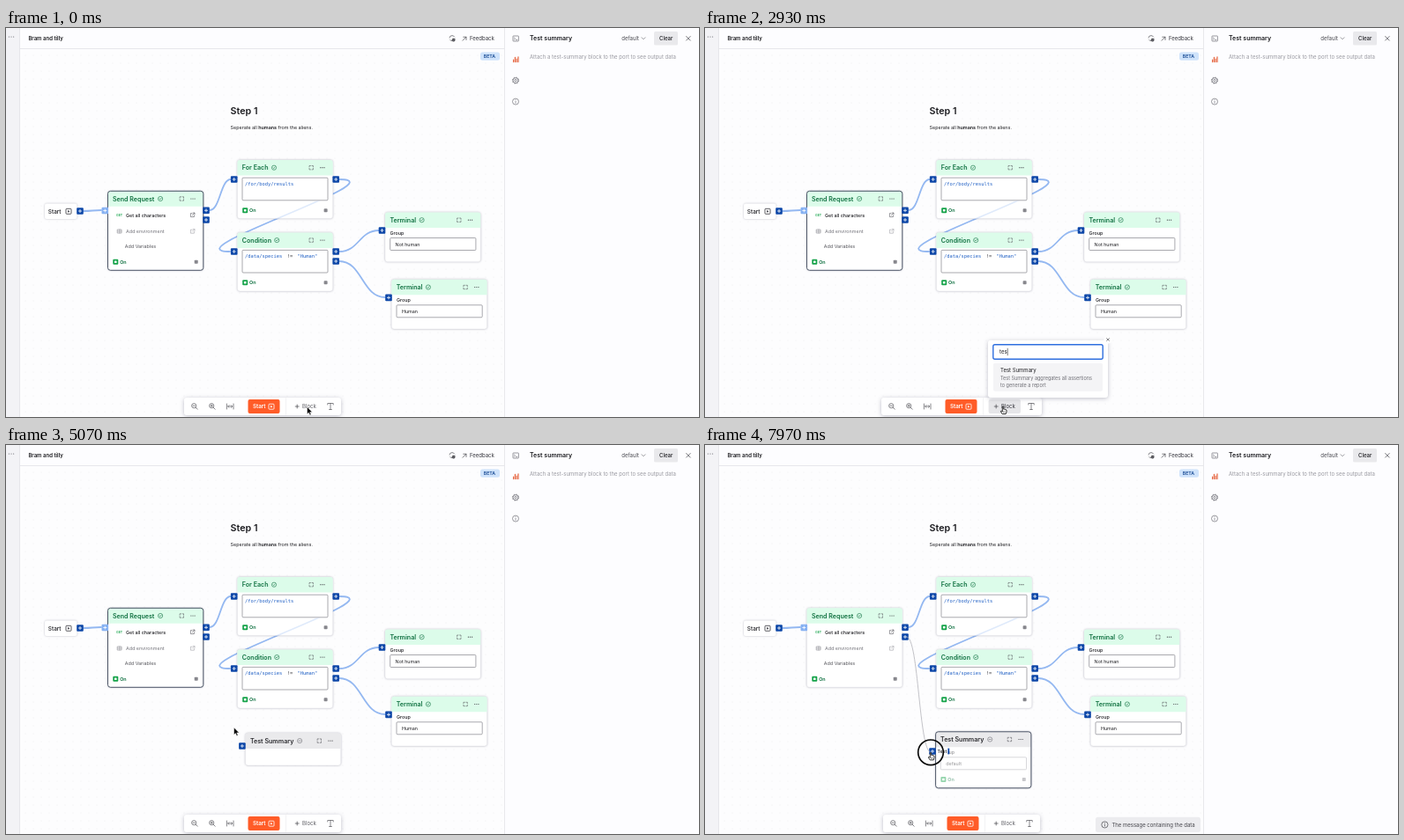
Write an HTML page that moves like this. It is 786 px wide and 442 px high and loops after 8000 ms.

```html
<!DOCTYPE html>
<html lang="en">
<head>
<meta charset="utf-8">
<title>Flow editor</title>
<style>
  html, body { margin: 0; width: 100%; height: 100%; overflow: hidden; background: #fcfcfe; }
  svg { display: block; width: 786px; height: 442px; font-family: Inter, sans-serif; }
  .mono { font-family: "DejaVu Sans Mono", monospace; }
  .card { filter: drop-shadow(0 .7px 1px rgba(30, 30, 60, .28)); }
  .pop { filter: drop-shadow(0 1px 2.5px rgba(30, 30, 60, .28)); }
</style>
</head>
<body>
<svg id="stage" viewBox="0 0 786 442" xmlns="http://www.w3.org/2000/svg"></svg>
<script>
const INK = '#1c1c20', GRAY = '#6f6f76', GREEN = '#0f7040', BLUE = '#0d47a8';
const LOOP = 8000;

// ---- drawing helpers; text is placed by its left edge and optical centre
const text = (x, cy, str, size = 5.4, fill = INK, weight = 400, extra = '') =>
  `<text x="${x}" y="${(cy + size * .36).toFixed(2)}" font-size="${size}" fill="${fill}" font-weight="${weight}" ${extra}>${str}</text>`;
const rect = (x, y, w, h, fill, r = 0, extra = '') =>
  `<rect x="${x}" y="${y}" width="${w}" height="${h}" rx="${r}" fill="${fill}" ${extra}/>`;
const line = (d, color = GRAY, w = .7, extra = '') =>
  `<path d="${d}" fill="none" stroke="${color}" stroke-width="${w}" stroke-linecap="round" stroke-linejoin="round" ${extra}/>`;
const circle = (x, y, r, fill, extra = '') => `<circle cx="${x}" cy="${y}" r="${r}" fill="${fill}" ${extra}/>`;
const group = (id, body, extra = '') => `<g id="${id}" ${extra}>${body}</g>`;
const dots = (x, y, gap = 2.1, color = '#44444a') =>
  [-gap, 0, gap].map(d => circle(x + d, y, .6, color)).join('');

const port = (x, y, fill = BLUE) => rect(x - 3.8, y - 3.8, 7.6, 7.6, fill, 1) +
  line(`M${x - 1.6} ${y}h3.2M${x} ${y - 1.6}v3.2`, '#fff', .8);
const expand = (x, y) => {
  const c = (sx, sy) => `M${x + sx * 2.2} ${y + sy * .8}v${sy * 1.4}h${-sx * 1.4}`;
  return line(c(-1, -1) + c(1, -1) + c(-1, 1) + c(1, 1), '#55555b', .6);
};
const status = (x, y, ok) => circle(x, y, 2.6, 'none', `stroke="${ok ? GREEN : GRAY}" stroke-width=".6"`) +
  line(ok ? `M${x - 1.1} ${y}l.8 .9l1.5 -1.7` : `M${x - 1.2} ${y}h2.4`, ok ? GREEN : GRAY, .6);
const field = (x, y, w, h) => rect(x, y, w, h, '#fff', 1, 'stroke="#85858c" stroke-width=".7"');
const onRow = (x, y) => rect(x + 5.8, y - 3, 6, 6, '#16a34a', 1) + rect(x + 7.5, y - 1.3, 2.6, 2.6, '#fff', .4) +
  text(x + 13.7, y, 'On', 5.4, GREEN, 600) + rect(x + 98.2, y - 2, 4, 4, '#87878d', .8);
const link = (x, y, color) => line(`M${x - .4} ${y - 1.8}h-1.8v4h4v-1.8M${x + .6} ${y - 2.4}h1.8v1.8M${x + 2.2} ${y - 2.2}l-2.4 2.4`, color, .6);
const play = (x, y, color) => rect(x - 3, y - 3, 6, 6, 'none', .8, `stroke="${color}" stroke-width=".8"`) +
  `<path d="M${x - .9} ${y - 1.4}l2.2 1.4l-2.2 1.4z" fill="${color}"/>`;

function node(x, y, h, title, iconDx, body, ok = true) {
  const w = 108.3, head = 17.5;
  return `<g class="card">${rect(x, y, w, h, '#fff', 3, 'stroke="#dedee3" stroke-width=".4"')}</g>` +
    `<path d="M${x} ${y + head}v${3 - head}q0 -3 3 -3h${w - 6}q3 0 3 3v${head - 3}z" fill="${ok ? '#dcfcea' : '#eaeaec'}"/>` +
    text(x + 5.4, y + 8.7, title, 7.1, ok ? GREEN : '#2c2c30', 600) + status(x + iconDx, y + 8.7, ok) +
    expand(x + 83.8, y + 8.7) + dots(x + 96.5, y + 8.7) + body;
}
const outline = (x, y, h) => rect(x, y, 108.3, h, 'none', 3, 'stroke="#3c4658" stroke-width=".9"');
const groupField = (x, y, value) => text(x + 5.6, y + 23.2, 'Group', 5.4, INK, 500) +
  field(x + 5.7, y + 29, 97.2, 14) + text(x + 11.6, y + 36.2, value);
const edge = (x1, y1, x2, y2, color = '#94b8f1', w = 1.8, extra = '') => {
  const gap = x2 - x1, reach = gap >= 0 ? gap / 2 : 6.25 * Math.sqrt(-gap);
  return line(`M${x1} ${y1}C${x1 + reach} ${y1} ${x2 - reach} ${y2} ${x2} ${y2}`, color, w, extra);
};

// ---- static chrome
const lens = (x, plus) => circle(x - .8, 429.2, 2.6, 'none', 'stroke="#55555b" stroke-width=".7"') +
  line(`M${x + 1.2} 431.2l2 2M${x - 2} 429.2h2.4${plus ? `M${x - .8} 428v2.4` : ''}`, '#55555b');

const chrome = rect(0, 0, 16, 442, '#f3f3f6') + dots(6, 10, 2.6, '#66666c') +
  rect(16, 0, 550, 24, '#fdfdff') + rect(566, 0, 220, 442, '#fdfdff') +
  line('M15.5 0V442M565.5 0V442M16 23.5H565', '#e2e2e7', .8) +
  text(25.4, 11.8, 'Bram and tilly', 6, INK, 600) +
  line('M518 14.2l4 -4m-3.2 0h3.2v3.2', '#44444a') + text(526, 11.8, 'Feedback', 6, '#33333a') +
  rect(538, 27.4, 22, 9.4, '#cfe3fb', 2.5) + text(541.8, 32.1, 'BETA', 5.2, '#174a94', 600) +
  rect(575, 9, 6.4, 6, 'none', .6, 'stroke="#6f6f76" stroke-width=".7"') + line('M576.4 11l1.2 1.1l-1.2 1.1M578.5 13.4h1.4') +
  line('M575.6 38.6v-2.6M577.4 38.6v-5.4M579.2 38.6v-3.6M581 38.6v-5.8', '#e4572e', 1.1) +
  circle(578, 59.6, 1.2, 'none', 'stroke="#6f6f76" stroke-width=".7"') +
  circle(578, 59.6, 3, 'none', 'stroke="#6f6f76" stroke-width=".8"') +
  circle(578, 59.6, 3.6, 'none', 'stroke="#6f6f76" stroke-width=".8" stroke-dasharray="1.4 1.43"') +
  circle(578, 83.6, 3.5, 'none', 'stroke="#6f6f76" stroke-width=".7"') + line('M578 83.4v1.8M578 81.8v.1') +
  text(594, 11.8, 'Test summary', 7, INK, 600) + text(698.3, 11.8, 'default', 6, '#4a4a50') +
  line('M721 10.8l2 2l2 -2') + rect(735, 4, 27, 15.4, '#e9e9ec', 1.5) + text(741, 11.8, 'Clear', 6, INK, 500) +
  line('M771.6 9.5l4.6 4.6m0 -4.6l-4.6 4.6', '#55555b', .8) +
  text(594, 32.6, 'Attach a test-summary block to the port to see output data', 6, '#9a9aa1');

const saved = circle(506, 11.6, 3, 'none', 'stroke="#55555b" stroke-width=".7" stroke-dasharray="7.5 1.9"') +
  circle(507.6, 13.6, 1.9, '#44444a') + line('M506.8 13.6l.6 .6l1 -1.1', '#fff', .4);
const saving = line('M476 11.2a3 3 0 0 1 5.6 -1m.3 -1.5v1.8h-1.8M482 12.2a3 3 0 0 1 -5.6 1m-.3 1.5v-1.8h1.8', '#55555b') +
  text(485, 11.8, 'Saving...', 6, '#55555b');

// ---- canvas
const loop = [378, 172, 254, 254];
const edges = edge(88, 208, 108, 207) + edge(231, 207, 255, 172) + edge(...loop) +
  edge(378, 254, 423, 230) + edge(378, 265, 430, 306);

const requestBody = text(125, 212.6, 'GET', 3.6, '#16a34a', 600) + text(136, 212.6, 'Get all characters', 5.4, INK, 500) +
  link(211.6, 212.4, '#55555b') +
  line('M126.6 229h4.4v4h-4.4zM126.6 231h4.4M128.8 229v4', '#8a8a90', .6) +
  text(136, 231, 'Add environment', 5.4, '#75757c') + link(211.6, 231, '#a2a2a8') +
  text(134.8, 248, 'Add Variables', 5.4, '#55555b') + onRow(115.5, 265.8);
const code = (x, y, str, fill = '#1f5fc4') => text(x, y, str, 5.4, fill, 400, 'class="mono"');

const nodes = `<g class="card">${rect(44, 199.5, 36.5, 17.5, '#fff', 2)}</g>` +
  text(47.8, 208.3, 'Start', 6.4, INK, 500) + play(71, 208.3, '#33333a') +
  node(115.5, 185.3, 90, 'Send Request', 59.6, requestBody) +
  node(262.4, 150, 66.6, 'For Each', 41.6, field(268, 170.2, 97, 25.6) + code(271, 177, '/for/body/results') + onRow(262.4, 207.2)) +
  node(262.4, 232.4, 66.6, 'Condition', 44.8, field(268, 252.4, 97, 25.6) + code(271, 259.2, '/data/species') +
    code(318.8, 259.2, '!=', '#33333a') + code(330.6, 259.2, '"Human"') + onRow(262.4, 289.3)) +
  node(430, 209.5, 56.3, 'Terminal', 41.6, groupField(430, 209.5, 'Not human')) +
  node(437.3, 285.8, 56.3, 'Terminal', 41.6, groupField(437.3, 285.8, 'Human')) +
  edge(...loop, '#94b8f1', 1.6, 'opacity=".3" clip-path="url(#eachFoot)"');

const ports = [[84, 208], [227, 207.3], [227, 218], [258.7, 172], [374.2, 172], [258.7, 254], [374.2, 254],
  [374.2, 265], [426.5, 230], [434, 306.4]].map(p => port(...p)).join('') + port(112.3, 207.5, '#86b1f2');

const ghost = node(0, 0, 36.6, 'Test Summary', 61.6, '', false) + port(-3.6, 14.6);
const summary = node(261.6, 325.8, 64, 'Test Summary', 61.6,
  group('summaryBody', groupField(261.6, 325.8, 'default') + onRow(261.6, 380)), false) +
  outline(261.6, 325.8, 64) + port(258, 348);

// ---- toolbar and block menu
const toolbar = rect(0, 420, 178, 20, '#fff', 3, 'id="bar" class="pop"') +
  group('barLeft', lens(214) + lens(234, true) +
    line('M250.4 427v6M258 427v6M251.8 430h4.8M253 428.7l-1.3 1.3l1.3 1.3M255.4 428.7l1.3 1.3l-1.3 1.3', '#55555b') +
    rect(274.5, 422, 36, 16, '#ff5c28', 2) + text(280, 430.2, 'Start', 6.2, '#fff', 600) + play(301, 430.2, '#fff') +
    line('M317.5 420.5v19', '#ededf0')) +
  rect(321.6, 422, 36.4, 16, '#e6e6e9', 2, 'id="blockHover"') +
  line('M328.2 430h4M330.2 428v4', '#44444a') + text(336, 430.2, 'Block', 6, '#4a4a50', 400, 'id="blockLabel"') +
  group('barRight', line('M364.8 428v-1.5h6.4v1.5M368 426.5v7M366.6 433.5h2.8', '#55555b'));

const menu = (y, body) => `<g class="pop">${rect(321, y, 136, 420 - y, '#fff', 3)}</g>` +
  circle(457, y - .8, 4.6, '#fff') + line(`M455.6 ${y - 2.2}l2.8 2.8m0 -2.8l-2.8 2.8`, '#55555b') +
  rect(326.8, y + 5, 124.4, 16.4, '#fff', 2, 'stroke="#2f6fdf" stroke-width="1.4"') + body;
const option = (y, w, title, first, second) => rect(327, y, w, 32, '#f4f4f6', 2) + text(335, y + 8, title, 6) +
  text(335, y + 17.2, first, 5.5, GRAY) + text(335, y + 25, second, 5.5, GRAY);
const fullMenu = menu(248.6, option(275, 119, 'Check', 'Pass the data through if the check', 'passes') +
  ['Concatenate', 'Condition', 'Create Data', 'Create Durables', 'Delay']
    .map((s, i) => text(335, 319.2 + 20 * i, s, 6)).join('') +
  rect(446.6, 273.5, 3, 139, '#f1f1f3') + rect(446.8, 273.5, 2.6, 69.5, '#87878b', 1));
const foundMenu = menu(354.8, option(380.8, 124, 'Test Summary', 'Test Summary aggregates all assertions', 'to generate a report'));

const hint = rect(443, 422.8, 119, 17.2, '#ececef', 2.5) +
  circle(453.4, 431.4, 3.6, 'none', 'stroke="#44444a" stroke-width=".7"') + line('M453.4 431.2v1.8M453.4 429.6v.1', '#44444a') +
  text(461.4, 431.6, 'The message containing the data', 6, '#44444a');

const arrow = '<path d="M0 0V8.3L1.9 6.5L3.2 9.4L4.6 8.8L3.3 5.9H5.9Z" fill="#000" stroke="#fff" stroke-width=".5"/>';
const hand = '<path d="M-.7 .5Q0 -.4 .7 .5V3.2L1.8 3.1L2.9 3.5L4 4.1V6.2L3.2 8.6H-.8L-2.6 5.8Q-2.6 4.8 -1.7 5.2L-.7 6Z" fill="#fff" stroke="#000" stroke-width=".8"/>' +
  line('M.7 5.6v1.6M2 5.6v1.6', '#000', .4);

const stage = document.getElementById('stage');
stage.innerHTML = `<defs><pattern id="grid" width="9" height="9" patternUnits="userSpaceOnUse">${circle(4, 4, .4, '#d9d9df')}</pattern>
  <clipPath id="eachFoot">${rect(263, 196.4, 107.4, 20, '#000')}</clipPath></defs>` +
  rect(0, 0, 786, 442, '#fdfdfe') + rect(16, 24, 550, 418, 'url(#grid)') + chrome + group('saved', saved) + group('saving', saving) +
  text(254.6, 93.8, 'Step 1', 10.7, INK, 600) +
  text(254.6, 112.6, 'Seperate all <tspan font-weight="600">humans</tspan> from the aliens.', 5.4, INK) +
  edges + nodes + group('selected', outline(115.5, 185.3, 90)) + ports +
  group('ghost', ghost) + group('summary', summary) +
  line('', '#aaaab0', .7, 'id="wire"') +
  group('portLabel', rect(262.4, 344.4, 13, 7.4, '#fff') + text(263.6, 348.2, 'Test', 5.2, INK, 500) + rect(275.4, 344.6, 1.8, 6.8, BLUE)) +
  toolbar + group('hint', hint) + group('fullMenu', fullMenu) + group('foundMenu', foundMenu) +
  group('query', text(334, 0, '', 6, INK, 400, 'id="queryText"') + line('M0 -3.8V3.8', '#222', .6, 'id="caret"')) +
  circle(0, 0, 10, 'none', 'id="ring" stroke="#0a0a0a" stroke-width="1.7"') +
  group('cursor', group('arrow', arrow) + group('hand', hand));

// ---- timeline
const path = [[0, 341.5, 430.5], [250, 341.5, 430.5], [500, 338, 430], [3100, 338, 430], [3600, 349.5, 386],
  [4250, 349.5, 386], [4900, 258.5, 321], [5300, 258.5, 321], [5600, 258, 318], [6300, 258, 318],
  [6950, 227, 217], [7060, 227, 217], [7170, 238, 238.5], [7800, 256, 349.3]];
const presses = [[560, 760], [4130, 4300], [5160, 5330], [7050, LOOP]];
const keys = [2500, 2660, 2810, 2950];
const OPEN = 750, PICK = 4220, PLACE = 5250, DRAG = 7060, HOVER = 7720;

const $ = id => document.getElementById(id);
const show = (id, on) => $(id).setAttribute('display', on ? 'inline' : 'none');
const move = (id, x, y) => $(id).setAttribute('transform', `translate(${x} ${y})`);
const within = (t, a, b) => t >= a && t < b;

function pointer(t) {
  const i = path.findIndex(k => k[0] > t);
  if (i < 0) return path[path.length - 1].slice(1);
  const [t0, x0, y0] = path[i - 1], [t1, x1, y1] = path[i];
  const u = (t - t0) / (t1 - t0), e = u * u * (3 - 2 * u);
  return [x0 + (x1 - x0) * e, y0 + (y1 - y0) * e];
}

function draw(t) {
  const [x, y] = pointer(t);
  const wide = within(t, 250, PICK), open = within(t, OPEN, PICK);
  const typed = keys.filter(k => k <= t).length, found = typed > 2;

  move('cursor', x, y);
  const pointing = within(t, 250, 3150) || within(t, 6900, DRAG) || t >= HOVER;
  show('hand', pointing);
  show('arrow', !pointing);
  const press = presses.find(([a, b]) => within(t, a, b));
  show('ring', press);
  if (press) {
    move('ring', x, y);
    $('ring').setAttribute('r', 8 + 6.3 * Math.min(1, (t - press[0]) / 300));
  }

  $('bar').setAttribute('x', wide ? 200 : 202);
  $('bar').setAttribute('width', wide ? 182 : 178);
  move('barLeft', wide ? -2 : 0, 0);
  move('barRight', wide ? 2 : 0, 0);
  show('blockHover', wide);
  $('blockLabel').setAttribute('fill', wide ? '#33333a' : '#5c5c62');

  show('fullMenu', open && !found);
  show('foundMenu', open && found);
  show('query', open);
  move('query', 0, found ? 368 : 261.8);
  $('queryText').textContent = typed ? 'test'.slice(0, typed) : 'Search';
  $('queryText').setAttribute('fill', typed ? INK : '#a0a0a6');
  const lastKey = typed ? keys[typed - 1] : OPEN;
  show('caret', (t - lastKey) % 1000 < 500);
  move('caret', typed ? 334.4 + [2.2, 5.7, 8.8, 11][typed - 1] : 333.6, 0);

  show('ghost', within(t, PICK + 60, PLACE));
  move('ghost', x + 13, y + 6.4);
  show('summary', t >= PLACE);
  show('selected', t < PLACE);
  const busy = within(t, 6760, 7460);
  show('saving', busy);
  show('saved', !busy);

  show('wire', t >= DRAG);
  const mid = (229 + x) / 2;
  $('wire').setAttribute('d', `M229 218C${mid} 218 ${mid} ${y} ${x} ${y}`);
  const over = t >= HOVER;
  $('summaryBody').setAttribute('opacity', over ? .45 : 1);
  show('portLabel', over);
  show('hint', over);
}

const begin = performance.now();
function tick() {
  draw((performance.now() - begin) % LOOP);
  requestAnimationFrame(tick);
}
tick();
</script>
</body>
</html>
```
